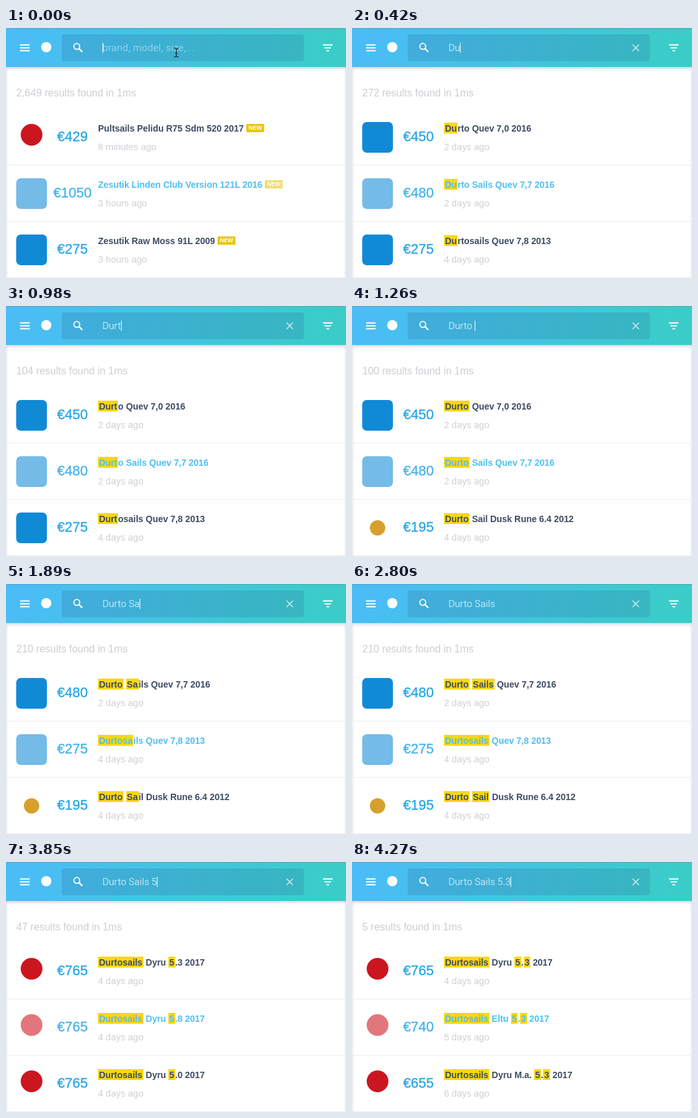
Write an HTML page that moves like this. It is 532 px wide and 391 px high and loops after 4.55 s.

```html
<!DOCTYPE html>
<html lang="en">
<head>
<meta charset="utf-8">
<title>Instant search</title>
<style>
  html, body { margin: 0; width: 100%; height: 100%; overflow: hidden; background: #fff; }
  #stage { position: relative; width: 532px; height: 391px; overflow: hidden; background: #fff;
    font-family: "Liberation Sans", Arial, sans-serif; white-space: pre; }
  #stage div, #stage svg { position: absolute; }
  .panel { left: 0; top: 50px; width: 532px; height: 360px; box-shadow: inset 0 0 4px rgba(90, 90, 150, .3); }
  .bar { left: 0; top: 0; width: 532px; height: 61px; box-sizing: border-box;
    border-top: 1px solid rgba(120, 130, 140, .5);
    background: linear-gradient(100deg, #4bbcf8, #3acdc6) border-box;
    box-shadow: 0 1px 6px rgba(70, 80, 140, .35); }
  .field { left: 87px; top: 10px; width: 379px; height: 42px; border-radius: 4px; background: rgba(30, 80, 130, .17); }
  #query, #hint { left: 151px; top: 21px; color: #fff; font: 300 15px/20px Roboto, sans-serif; letter-spacing: .13px; }
  #hint { color: rgba(255, 255, 255, .65); letter-spacing: .53px; }
  #caret { display: inline-block; width: 1px; height: 16px; margin-right: -1px; background: #fff; vertical-align: -3px; }
  #count { left: 16px; top: 91px; font-size: 16px; line-height: 21px; color: #cdced3; }
  #rows { left: 0; top: 127px; }
  .row { left: 0; width: 532px; height: 88px; box-sizing: border-box; border-bottom: 1px solid #ededf1; }
  .price { left: 64px; top: 31px; width: 80px; text-align: center; font-size: 21.6px; line-height: 24px;
    color: #28a8e8; -webkit-text-stroke: .4px #28a8e8; }
  .title { left: 144px; top: 21px; font-size: 14px; line-height: 18px; font-weight: bold;
    letter-spacing: -.05px; color: #3e4c63; }
  .date { left: 144px; top: 50px; font-size: 14.5px; line-height: 18px; color: #cfd0d5; }
  mark { padding: 1px 1.4px 0; color: inherit; background: #fad714; }
  .new { position: absolute; left: 100%; top: 2px; width: 28px; height: 13px; margin-left: 4px; border-radius: 1px;
    background: #e9c70f; color: #fff; font-size: 9px; line-height: 13px; text-align: center; }
  .wind { left: 16px; top: 20px; width: 48px; height: 48px; border-radius: 7px; background: #118ad6; }
  .surf { left: 23px; top: 23px; width: 34px; height: 34px; border-radius: 50%; background: #cb1620; }
  .gold { left: 28px; top: 32px; width: 24px; height: 24px; border-radius: 50%; background: #d7a02c; }
  .hover .title { color: #4fbff3; }
  .hover .price { opacity: .85; }
  .hover .logo, .hover .new { opacity: .58; }
</style>
</head>
<body>
<div id="stage">
  <div class="panel"></div>
  <div id="count"></div>
  <div id="rows"></div>
  <div class="bar"></div>
  <div class="field"></div>
  <div id="hint">brand, model, size,...</div>
  <div id="query"><span id="text"></span><span id="caret"></span></div>
  <svg width="532" height="61" style="left:0;top:0" fill="none" stroke="#fff" stroke-width="1.8">
    <path d="M22 26.5h15M22 31h15M22 35.5h15"/>
    <circle cx="63" cy="30" r="8" fill="#fff" stroke="none"/>
    <circle cx="110.8" cy="28.8" r="4.6"/>
    <path d="M114 32l5.4 5.4" stroke-width="2.2"/>
    <path d="M496 26.5h15M498.5 31h10M501.5 35.5h4"/>
    <path id="clear" d="M439 26l10 10M449 26l-10 10" stroke-width="1.5" opacity=".75"/>
    <path id="beam" d="M263 31.5q3 0 3.5 2q.5-2 3.5-2M266.5 33v11M263 45.5q3 0 3.5-2q.5 2 3.5 2M264.5 39.5h4"
      stroke="#1d2530" stroke-width="1.2"/>
  </svg>
</div>
<script>
const LOOP = 4550;
const $ = id => document.getElementById(id);
const item = (logo, price, title, date, fresh) => ({ logo, price, title, date, fresh });

const quev70 = item('wind', 450, 'Durto Quev 7,0 2016', '2 days');
const quev77 = item('wind', 480, 'Durto Sails Quev 7,7 2016', '2 days');
const quev78 = item('wind', 275, 'Durtosails Quev 7,8 2013', '4 days');
const dusk = item('gold', 195, 'Durto Sail Dusk Rune 6.4 2012', '4 days');
const dyru = size => item('surf', 765, `Durtosails Dyru ${size} 2017`, '4 days');

const latest = [
  item('surf', 429, 'Pultsails Pelidu R75 Sdm 520 2017', '8 minutes', true),
  item('wind', 1050, 'Zesutik Linden Club Version 121L 2016', '3 hours', true),
  item('wind', 275, 'Zesutik Raw Moss 91L 2009', '3 hours', true)
];
const brand = [quev70, quev77, quev78];
const spaced = [quev70, quev77, dusk];
const sails = [quev77, quev78, dusk];
const fives = [dyru('5.3'), dyru('5.8'), dyru('5.0')];
const exact = [
  dyru('5.3'),
  item('surf', 740, 'Durtosails Eltu 5.3 2017', '5 days'),
  item('surf', 655, 'Durtosails Dyru M.a. 5.3 2017', '6 days')
];

// time, typed text, result count, results, caret hidden
const steps = [
  [0, '', '2,649', latest],
  [70, 'D', '2,649', latest],
  [350, 'D', '1,034', brand],
  [420, 'Du', '272', brand],
  [770, 'Dur', '118', brand],
  [910, 'Durt', '104', brand],
  [1050, 'Durto', '104', brand],
  [1260, 'Durto ', '100', spaced],
  [1680, 'Durto S', '100', spaced],
  [1750, 'Durto S', '210', sails],
  [1890, 'Durto Sa', '210', sails],
  [1960, 'Durto Sai', '210', sails],
  [2030, 'Durto Sail', '210', sails],
  [2170, 'Durto Sails', '210', sails],
  [2310, 'Durto Sails ', '210', sails],
  [2800, 'Durto Sails ', '210', sails, true],
  [3290, 'Durto Sails ', '210', sails],
  [3850, 'Durto Sails 5', '47', fives],
  [4060, 'Durto Sails 5.', '47', fives],
  [4270, 'Durto Sails 5.3', '5', exact]
];

function highlight(title, query) {
  const words = query.split(/[ .]+/).filter(Boolean);
  if (!words.length) return title;
  const parts = [words.slice(0, 2).join(''), ...words].map(w => w.replace(/ls$/, 'ls?'));
  return title.replace(new RegExp(`\\b(?:${parts.join('|')})`, 'gi'), '<mark>$&</mark>');
}

function rowHtml(r, i, query) {
  const badge = r.fresh ? '<span class="new">NEW</span>' : '';
  return `<div class="row${i === 1 ? ' hover' : ''}" style="top:${88 * i}px">` +
    `<div class="logo ${r.logo}"></div><div class="price">€${r.price}</div>` +
    `<div class="title">${highlight(r.title, query)}${badge}</div>` +
    `<div class="date">${r.date} ago</div></div>`;
}

const show = (id, on) => { $(id).style.visibility = on ? 'visible' : 'hidden'; };

let shown;
function draw(t) {
  const step = steps.findLast(s => s[0] <= t);
  if (step === shown) return;
  shown = step;
  const [, query, count, rows, hidden] = step;
  $('text').textContent = query;
  show('hint', !query);
  show('clear', query);
  show('beam', rows === latest);
  show('caret', !hidden);
  $('count').textContent = `${count} results found in 1ms`;
  $('rows').innerHTML = rows.map((r, i) => rowHtml(r, i, query)).join('');
}

let start;
function tick() {
  const now = performance.now();
  start ??= now;
  draw((now - start) % LOOP);
  requestAnimationFrame(tick);
}
tick();
</script>
</body>
</html>
```
